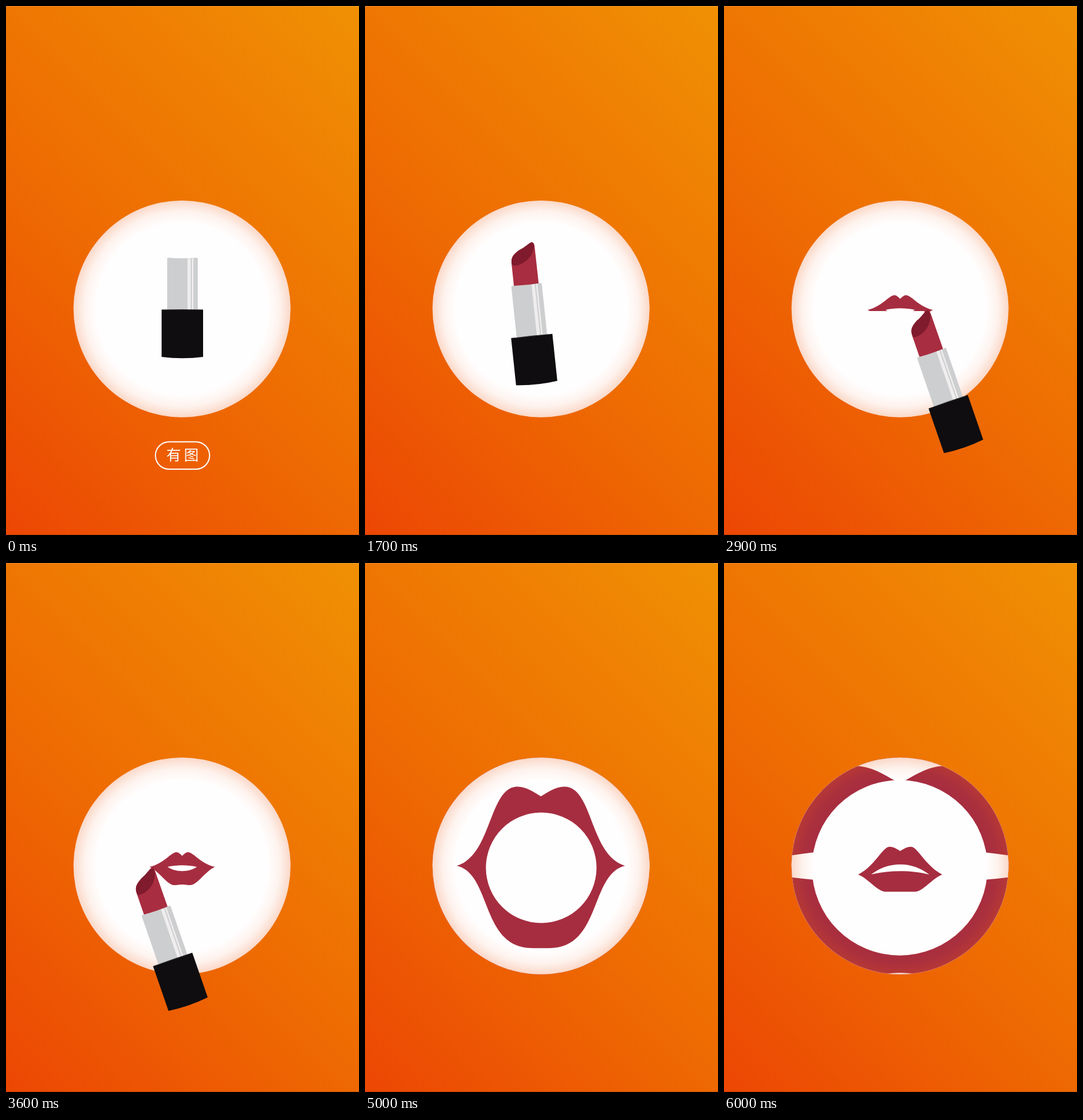
Animation, 600 px wide and 900 px high, one loop 6100 ms. Source, as an HTML page:

```html
<!DOCTYPE html>
<html lang="zh">
<head>
<meta charset="utf-8">
<title>Lipstick</title>
<style>
  html, body { margin: 0; width: 100%; height: 100%; overflow: hidden; }
  body { background: #ee6c03; }
  svg { display: block; width: 600px; height: 900px; background: linear-gradient(45deg, #ec4704, #ee6c02 45%, #f09004); }
  text { font: 25px "Noto Sans CJK SC", "Noto Sans CJK", sans-serif; letter-spacing: 5px; fill: #fff; }
</style>
</head>
<body>
<svg viewBox="0 0 600 900">
  <defs>
    <radialGradient id="glow" gradientUnits="userSpaceOnUse" cx="299.2" cy="515.3" r="184.4">
      <stop offset=".79" stop-color="#ec5a14" stop-opacity="0"/>
      <stop offset=".9" stop-color="#ec5a14" stop-opacity=".07"/>
      <stop offset="1" stop-color="#ec5a14" stop-opacity=".23"/>
    </radialGradient>
    <clipPath id="disc"><circle cx="299.2" cy="515.3" r="184.4"/></clipPath>
    <clipPath id="painted">
      <rect id="upper" x="0" y="300" height="219"/>
      <rect id="lower" y="518" width="700" height="300"/>
    </clipPath>
  </defs>

  <rect width="600" height="1" fill="#fff" opacity=".15"/>
  <rect y="899" width="600" height="1" opacity=".15"/>
  <circle cx="299.2" cy="515.3" r="184.4" fill="#fffefe"/>
  <g id="mouths" clip-path="url(#disc)" fill="#a62d40" fill-rule="evenodd"></g>
  <circle cx="299.2" cy="515.3" r="184.4" fill="url(#glow)"/>

  <g id="stick">
    <g id="bullet">
      <path fill="#a82d40" d="M278.5 392C278 379 284 375 294 369C304 365 309 361 314 358.5Q320 356 320.5 365L321 480H278.5Z"/>
      <path fill="#801a2d" d="M279 392C278 379 284 375 294 369C304 365 309 361 314 358.5Q320 356 319.5 365C317 379 305 391 290 394C283 395 279 394 279 392Z"/>
    </g>
    <path fill="#cdcecf" d="M274 518V430Q274 428 276 428.3Q300 430 324 428.3Q326 428 326 430V518Z"/>
    <path fill="#efeded" d="M308.5 429.5H314V517H308.5ZM316 429.3H318.5V517H316Z"/>
    <path fill="#0f0d10" d="M264.5 516.5Q300 515.5 335 516.5V597Q300 601.5 264.5 597Z"/>
    <path d="M267 516.7H333" stroke="#777" stroke-width=".8" stroke-dasharray="1 1"/>
  </g>

  <g id="pill">
    <rect x="254" y="741.5" width="92" height="46.5" rx="23.2" fill="none" stroke="#fff" stroke-width="2"/>
    <text x="302.5" y="773" text-anchor="middle">有图</text>
  </g>

  <g id="hand" fill="#f4c1a6">
    <path d="M284 120L262 92Q248 76 237 86Q230 94 240 110L284 186Z"/>
    <rect x="284" width="34" height="260" rx="17"/>
    <rect x="318" y="78" width="36" height="180" rx="17"/>
    <rect x="353" y="84" width="36" height="180" rx="17"/>
    <rect x="388" y="94" width="36" height="180" rx="17"/>
    <rect x="284" y="116" width="140" height="160"/>
    <rect x="289" y="5" width="24" height="31" rx="12" fill="#f5d7c8"/>
  </g>
</svg>

<script>
const LOOP = 6100, STEP = 100;
const $ = id => document.getElementById(id);

// Linear interpolation through rows of [time, ...values].
function at(t, keys) {
  if (t <= keys[0][0]) return keys[0].slice(1);
  for (let i = 1; i < keys.length; i++) {
    const a = keys[i - 1], b = keys[i];
    if (t < b[0]) {
      const k = (t - a[0]) / (b[0] - a[0]);
      return a.slice(1).map((v, j) => v + (b[j + 1] - v) * k);
    }
  }
  return keys[keys.length - 1].slice(1);
}

// Lip shapes for a half width of 1: notch, peak, upper curve,
// lower curve, lower lobe, base, then opening width, top and bottom.
const drawn = [-.34, .18, -.45, .34, .57, -.09, .7, .14, .46, .56, .24, .56, .54, .45, -.05, .13];
const wide  = [-.41, .18, -.5, .34, .55, -.2, .72, .12, .55, .52, .25, .535, .515, .45, -.07, .1];
const round = [-.825, .28, -.94, .62, .58, -.12, .58, .1, .72, .98, .1, .98, .98, .55, -.3, .3];
const smile = [-.56, .25, -.66, .42, .6, -.2, .75, .1, .55, .4, .35, .41, .41, .69, -.24, -.08];
const open  = [-.447, .24, -.54, .42, .7, -.3, .85, .35, .5, .6, .2, .58, .56, .9, -.105, .085];

// Each mouth has its own track of [time, x, y, half width, ...shape];
// the disc inside it starts at "disc" and grows evenly.
const mouths = [
  { from: 2100, disc: 3900, x: 300, keys: [
    [3600, 299.5, 517, 55.5, ...drawn], [3800, 301, 517, 90, ...drawn],
    [4200, 307.5, 516, 250, ...wide], [4600, 307.5, 516, 450, ...wide]] },
  { from: 4400, disc: 4600, x: 299.5, keys: [
    [4400, 299.5, 526, 0, ...smile], [4600, 299.5, 530, 71.5, ...smile],
    [5000, 299, 515, 143, ...round], [5400, 299, 515, 300, ...round]] },
  { from: 5100, disc: 5365, x: 298.7, keys: [
    [5100, 299.5, 526, 0, ...smile], [5300, 299.5, 530, 71.5, ...smile],
    [5600, 299.5, 520, 160, ...open], [6000, 299, 518, 320, ...open]] },
  { from: 5800, disc: 9999, x: 299, keys: [
    [5800, 299.5, 526, 0, ...smile], [6000, 299.5, 530, 71.5, ...smile]] }
];

const stickKeys = [
  [1500, 317, 358, 0], [1600, 307, 370, -2], [1700, 284, 402, -6], [1800, 254, 443, -11],
  [1900, 224, 482, -16], [2000, 200, 507, -18.5], [2100, 189, 515, -19],
  [2200, 238, 517, -19], [2300, 274, 502, -19], [2400, 292, 493, -19],
  [2500, 311, 493, -19], [2650, 334, 507, -19], [2800, 353, 517, -19], [2850, 353, 517, -19],
  [3200, 302, 522, -19], [3600, 248, 519, -19],
  [3700, 248, 556, -19], [3800, 248, 660, -19], [3900, 248, 800, -19], [4000, 248, 940, -19]];
const bulletKeys = [[800, 75], [900, 58], [1000, 33], [1100, 10], [1200, 0]];
const pillKeys = [[700, 1], [800, .9], [900, .58], [1000, .2], [1100, 0]];
const handKeys = [[300, 910], [400, 890], [500, 835], [600, 785], [700, 764],
  [800, 768], [900, 803], [1000, 855], [1100, 910]];

function lipsPath([cx, cy, w, n, lx, ly, c1, c2x, c2y, e1x, e1y, e2x, e2y, bx, by, d, mw, mt, mb]) {
  const p = (x, y) => (cx + x * w).toFixed(2) + ' ' + (cy + y * w).toFixed(2) + ' ';
  const rightHalf = [
    [0, n], [lx * .3, n + (ly - n) * .4], [lx * .6, ly], [lx, ly],
    [c1, ly], [c2x, c2y], [1, 0],
    [e1x, e1y], [e2x, e2y], [bx, by],
    [bx * .6, by], [bx * .4, d], [0, d]];
  const leftHalf = rightHalf.slice(0, -1).reverse().map(([x, y]) => [-x, y]);
  const [start, ...rest] = rightHalf.concat(leftHalf).map(([x, y]) => p(x, y));
  const m = mw * .4;
  return 'M' + start + 'C' + rest.join('') + 'Z' +
    'M' + p(-mw, 0) + 'C' + p(-m, mt * 4 / 3) + p(m, mt * 4 / 3) + p(mw, 0) +
    'C' + p(m, mb * 4 / 3) + p(-m, mb * 4 / 3) + p(-mw, 0) + 'Z';
}

function add(name) {
  const el = document.createElementNS('http://www.w3.org/2000/svg', name);
  $('mouths').append(el);
  return el;
}
for (const m of mouths) {
  m.lips = add('path');
  m.hole = add('circle');
  m.hole.setAttribute('cx', m.x);
  m.hole.setAttribute('cy', 518.5);
  m.hole.setAttribute('fill', '#fffefe');
}
mouths[0].lips.setAttribute('clip-path', 'url(#painted)');

function draw(t) {
  for (const m of mouths) {
    m.lips.setAttribute('d', t >= m.from ? lipsPath(at(t, m.keys)) : '');
    m.hole.setAttribute('r', Math.max(0, (t - m.disc) * .235));
  }

  const [x, y, angle] = at(t, stickKeys);
  $('stick').setAttribute('transform', `translate(${x} ${y}) rotate(${angle}) translate(-317 -358)`);
  $('stick').setAttribute('visibility', t < 4000 ? 'visible' : 'hidden');
  $('bullet').setAttribute('transform', `translate(0 ${at(t, bulletKeys)[0]})`);

  // The upper lip is painted to the right, the lower lip back to the left.
  const upperDone = t >= 2800, allDone = t >= 3600;
  $('upper').setAttribute('width', upperDone ? 700 : t < 2200 ? 0 : x);
  $('lower').setAttribute('x', allDone ? 0 : upperDone ? x - 5 : 700);

  const s = at(t, pillKeys)[0];
  $('pill').setAttribute('transform', `translate(300 758) scale(${s}) translate(-300 -758)`);
  $('hand').setAttribute('transform', `translate(0 ${at(t, handKeys)[0]})`);
}

const begin = performance.now();
function tick() {
  const t = (performance.now() - begin) % LOOP;
  draw(Math.floor(t / STEP) * STEP);
  requestAnimationFrame(tick);
}
tick();
</script>
</body>
</html>
```
